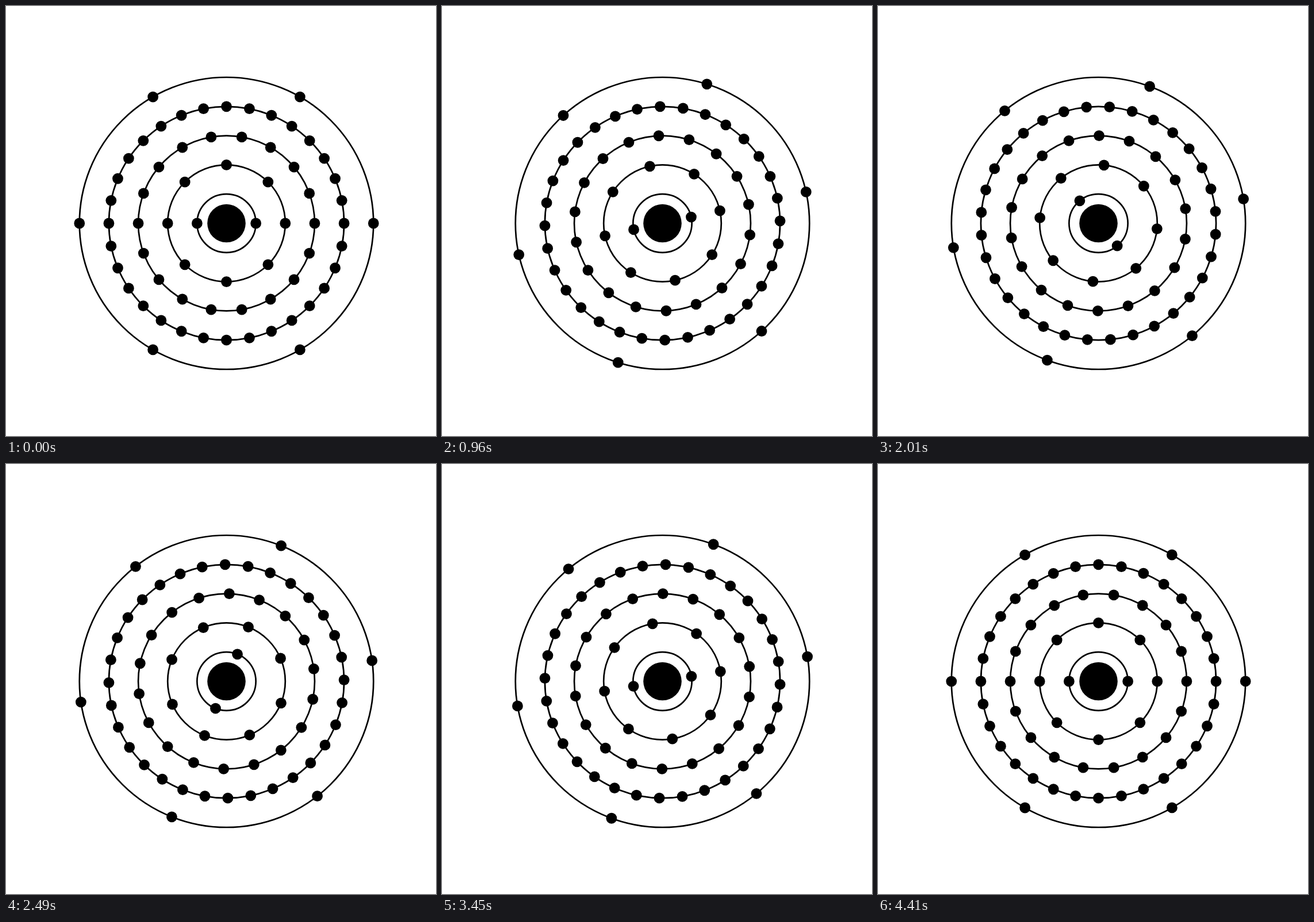
These frames come from a looping animation (748x748 px, 4.51 s). An HTML page with a canvas:

```html
<!DOCTYPE html>
<html lang="en">
<head>
<meta charset="utf-8">
<title>Electron shells</title>
<style>
  html, body { margin: 0; height: 100%; overflow: hidden; background: #fff; }
  canvas { display: block; }
</style>
</head>
<body>
<canvas id="stage" width="748" height="748"></canvas>
<script>
const ctx = document.getElementById('stage').getContext('2d');
const shells = [2, 8, 18, 32, 6];
const cx = 383.5, cy = 378, gapX = 51.15, gapY = 50.8;
const stepMs = 30, lastStep = 147, loopMs = 4510;

function disc(x, y, r) {
  ctx.beginPath();
  ctx.arc(x, y, r, 0, 2 * Math.PI);
  ctx.fill();
}

// Two clockwise turns: a short run-up, then a cubic slow-down.
function rotation(step) {
  const run = step < 6 ? step * step / 12 : step - 3;
  return -4 * Math.PI * (1 - run / lastStep) ** 3;
}

function draw(now) {
  const step = Math.min(lastStep, Math.floor(now % loopMs / stepMs));
  const turn = rotation(step);
  ctx.fillStyle = '#fff';
  ctx.fillRect(0, 0, 748, 748);
  ctx.fillStyle = ctx.strokeStyle = '#000';
  ctx.lineWidth = 2.7;
  disc(cx, cy, 33.3);
  shells.forEach((count, i) => {
    const rx = gapX * (i + 1), ry = gapY * (i + 1);
    ctx.beginPath();
    ctx.ellipse(cx, cy, rx, ry, 0, 0, 2 * Math.PI);
    ctx.stroke();
    for (let k = 0; k < count; k++) {
      const a = turn + 2 * Math.PI * k / count;
      disc(cx + rx * Math.cos(a), cy + ry * Math.sin(a), 9.4);
    }
  });
}

const start = performance.now();
function tick() {
  draw(performance.now() - start);
  requestAnimationFrame(tick);
}
tick();
</script>
</body>
</html>
```
